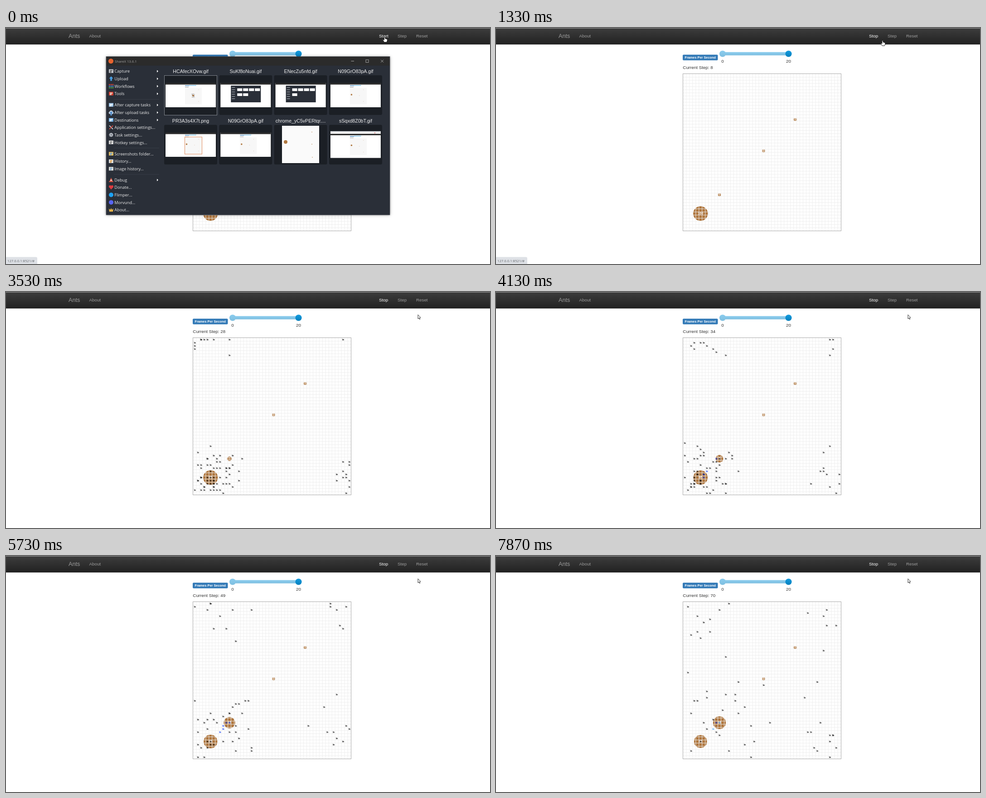
An HTML page with a canvas that plays this animation: 1068 px wide and 524 px high, repeating every 8000 ms.

```html
<!DOCTYPE html>
<html lang="en">
<head>
<meta charset="utf-8">
<title>Ants</title>
<style>
html, body { margin: 0; width: 100%; height: 100%; overflow: hidden; background: #fff; }
canvas { display: block; }
</style>
</head>
<body>
<canvas id="stage" width="1068" height="524"></canvas>
<script>
const ctx = document.getElementById('stage').getContext('2d');
const LOOP = 8000, TICK = 200 / 3;
const SANS = '"Liberation Sans", Arial, sans-serif', UI = '"Open Sans", "Noto Sans", sans-serif';
const BROWN = '#b07840';
const GRID = { x: 413, y: 102.2, n: 50, cell: 6.96 };
const NEST = [5, 44], FOOD = [[11, 38], [25, 24], [35, 14]];

// Piecewise linear interpolation through [x, y] points
function at(x, points) {
  let [px, py] = points[0];
  if (x <= px) return py;
  for (const [qx, qy] of points) {
    if (x < qx) return py + (qy - py) * (x - px) / (qx - px);
    [px, py] = [qx, qy];
  }
  return py;
}
function rect(x, y, w, h, color) { ctx.fillStyle = color; ctx.fillRect(x, y, w, h); }
function frame(x, y, w, h, color, width = 1) {
  ctx.strokeStyle = color; ctx.lineWidth = width; ctx.strokeRect(x, y, w, h);
}
function disc(x, y, r, color) {
  ctx.fillStyle = color; ctx.beginPath(); ctx.arc(x, y, r, 0, 7); ctx.fill();
}
function round(x, y, w, h, r, color) {
  ctx.fillStyle = color; ctx.beginPath(); ctx.roundRect(x, y, w, h, r); ctx.fill();
}
function poly(points, fill, stroke) {
  ctx.beginPath();
  points.forEach(([x, y]) => ctx.lineTo(x, y));
  ctx.closePath();
  if (fill) { ctx.fillStyle = fill; ctx.fill(); }
  if (stroke) { ctx.strokeStyle = stroke; ctx.lineWidth = 0.9; ctx.stroke(); }
}
function line(x1, y1, x2, y2, color, width = 1) {
  ctx.strokeStyle = color; ctx.lineWidth = width;
  ctx.beginPath(); ctx.moveTo(x1, y1); ctx.lineTo(x2, y2); ctx.stroke();
}
function text(str, x, y, size, color, align = 'left', family = SANS, weight = '') {
  ctx.font = `${weight} ${size}px ${family}`;
  ctx.fillStyle = color; ctx.textAlign = align;
  ctx.fillText(str, x, y + size * 0.36);
}
function vertical(y1, y2, from, to) {
  const g = ctx.createLinearGradient(0, y1, 0, y2);
  g.addColorStop(0, from); g.addColorStop(1, to);
  return g;
}

let seed = 11;
function random() {
  seed = (seed * 1664525 + 1013904223) % 4294967296;
  return seed / 4294967296;
}

// Drifting random walks out of the nest, one cell list per ant
const ANTS = 100, STEPS = 72;
const walks = Array.from({ length: ANTS }, (_, i) => {
  const angle = random() * 2 * Math.PI, speed = 0.24 * i / ANTS;
  let x = NEST[0] + 0.5, y = NEST[1] + 0.5;
  return Array.from({ length: STEPS }, () => {
    const cell = [x, y].map(v => (Math.floor(v) + 100) % GRID.n);
    x += Math.cos(angle) * speed + (random() - 0.5) * 2.2;
    y += Math.sin(angle) * speed + (random() - 0.5) * 2.2;
    return cell;
  });
});

const center = ([col, row]) => [GRID.x + (col + 0.5) * GRID.cell, GRID.y + (row + 0.5) * GRID.cell];

function ant(cell, color) {
  const [x, y] = center(cell);
  ctx.globalAlpha = 0.7;
  ctx.fillStyle = color;
  ctx.beginPath();
  ctx.ellipse(x + 0.5, y + 0.3, 2.3, 0.9, 0, 0, 7);
  ctx.fill();
  line(x - 2.5, y - 1.2, x + 1.4, y + 0.4, color, 0.5);
  line(x - 0.8, y - 2.4, x + 1, y + 2.4, color, 0.5);
  line(x + 0.8, y - 1.8, x - 1.4, y + 2.4, color, 0.5);
  ctx.globalAlpha = 1;
}

function drawAnts(step) {
  const gone = at(step, [[18, 0], [55, 43]]);
  walks.forEach((walk, i) => { if (i >= gone) ant(walk[step], '#1c1c1c'); });
  const carriers = Math.round(at(step, [[28, 0], [40, 7], [59, 3], [70, 3]]));
  for (let i = 0; i < carriers; i++) {
    const p = i ? Math.abs((step * 0.19 + i * 0.31) % 2 - 1) : 1;
    const cell = NEST.map((v, k) => Math.round(v + (FOOD[0][k] - v) * p + (i % 3 - 1) * (k ? 0 : 0.6)));
    ant(cell, step > 66 && i ? '#3a9cf0' : '#0a35ee');
  }
}

function pile(cell, r, count) {
  const [x, y] = center(cell);
  disc(x, y, r, BROWN);
  text(count, x, y - 0.3, 7, '#fff', 'center', SANS, 'bold');
}

function drawGrid(step, antsShown) {
  const { x, y, n, cell } = GRID, size = n * cell;
  const left = Math.round(at(step, [[27, 100], [40, 91], [59, 85], [70, 82]]));
  pile(NEST, at(step, [[28, 16.2], [40, 15.6], [59, 14.7], [70, 14.4]]), left);
  const radius = at(step, [[24, 3.2], [28, 5.2], [40, 11.7], [59, 13.7], [70, 14.2]]);
  FOOD.forEach((spot, i) => pile(spot, i ? 3.2 : radius, i ? 0 : 100 - left));
  for (let i = 1; i < n; i++) {
    line(x + i * cell, y, x + i * cell, y + size, '#eee', 0.9);
    line(x, y + i * cell, x + size, y + i * cell, '#eee', 0.9);
  }
  frame(412.5, 101.5, 349, 349, '#aaa');
  if (antsShown) drawAnts(step);
}

function drawPage(step, running) {
  rect(0, 0, 1068, 524, '#fff');
  rect(0, 0, 1068, 36, vertical(1, 36, '#3c3c3c', '#222'));
  rect(0, 0, 1068, 1, '#999');
  rect(0, 35.6, 1068, 0.9, '#080808');
  text('Ants', 138, 17.8, 12.6, '#9d9d9d');
  text('About', 183.5, 17.5, 9.8, '#9d9d9d');
  text(running ? 'Stop' : 'Start', 823, 17.5, 9.8, '#fff');
  text('Step', 864, 17.5, 9.8, '#9d9d9d');
  text('Reset', 905, 17.5, 9.8, '#9d9d9d');

  round(412, 59.3, 77.5, 12.5, 2, '#337ab7');
  text('Frames Per Second', 450.7, 65.3, 7.35, '#fff', 'center', SANS, 'bold');
  round(500, 53.5, 146, 7.2, 3, vertical(53, 61, '#8accee', '#7fbfe0'));
  disc(500, 57.2, 7, vertical(50, 64, '#8accee', '#7fbfe0'));
  disc(645.5, 57.2, 7, vertical(50, 64, '#149bdf', '#0480be'));
  text('0', 500, 73, 9.8, '#333', 'center');
  text('20', 645.5, 73, 9.8, '#333', 'center');
  text('Current Step: ' + step, 412.3, 87, 9.8, '#333');
}

function drawStatus(alpha) {
  ctx.globalAlpha = alpha;
  round(-4, 508.5, 73, 20, 3, '#dee1e6');
  text('127.0.0.1:8521/#', 3, 516.8, 7.7, '#5f6368', 'left', UI);
  ctx.globalAlpha = 1;
}

function drawHand(x, y) {
  const outline = [[-1, 0], [0.8, 0], [1.2, 4], [5, 5], [6, 6.5], [5.5, 9.5], [4.5, 12], [-0.8, 12], [-4, 7.2], [-3, 6.2], [-1.2, 7.4]];
  poly(outline.map(([dx, dy]) => [x + dx, y + dy]), '#fff', '#111');
}
function drawArrow(x, y) {
  const outline = [[0, 0], [0, 9], [2, 7.2], [3.4, 10.2], [4.8, 9.6], [3.5, 6.6], [6, 6.4]];
  poly(outline.map(([dx, dy]) => [x + dx, y + dy]), '#fff', '#222');
}

const icons = {
  box: (x, y, a, b) => { rect(x - 5, y - 4, 10, 8, a); rect(x - 3, y - 2, 6, 2, b); rect(x - 3, y + 1, 4, 2, b); },
  up: (x, y, a) => { poly([[x, y - 5], [x + 4.5, y], [x - 4.5, y]], a); rect(x - 1.7, y - 1, 3.4, 6, a); },
  grid: (x, y) => ['#e2483c', '#4d8fe0', '#58b04c'].forEach((c, i) => {
    for (let k = 0; k < 3; k++) rect(x - 5 + k * 3.8, y - 4.5 + i * 3.5, 2.6, 2.4, c);
  }),
  disc: (x, y, a) => disc(x, y, 5, a),
  cloud: (x, y, a, b) => { disc(x - 2.5, y + 1, 2.7, a); disc(x + 2.5, y + 1, 2.7, a); disc(x, y - 1, 3.2, a); icons.up(x, y + 2, b); },
  tools: (x, y, a, b) => { line(x - 4, y - 4, x + 4, y + 4, a, 2); line(x + 4, y - 4, x - 4, y + 4, b, 2); },
  gear: (x, y, a, b) => {
    for (let i = 0; i < 4; i++) {
      const c = 4.8 * Math.cos(i * 0.785), s = 4.8 * Math.sin(i * 0.785);
      line(x - c, y - s, x + c, y + s, a, 1.6);
    }
    disc(x, y, 3.2, a); disc(x, y, 1.2, b);
  },
  cone: (x, y, a, b) => { poly([[x, y - 5], [x + 4, y + 4], [x - 4, y + 4]], a); rect(x - 2, y, 4, 1.5, b); rect(x - 5, y + 3.5, 10, 1.3, a); },
  heart: (x, y, a) => { disc(x - 2.3, y - 1.8, 2.7, a); disc(x + 2.3, y - 1.8, 2.7, a); poly([[x - 4.8, y - 0.8], [x + 4.8, y - 0.8], [x, y + 5]], a); },
  crown: (x, y, a) => poly([[x - 5, y - 3], [x - 2, y], [x, y - 4], [x + 2, y], [x + 5, y - 3], [x + 4, y + 4], [x - 4, y + 4]], a),
};

// Menu groups: top y, then [label, icon, colour, accent, has submenu]
const menu = [
  [96, ['Capture', 'box', '#c9ccd2', '#555', 1], ['Upload', 'up', '#4aa3e8', '', 1],
    ['Workflows', 'grid', '', '', 1], ['Tools', 'box', '#d23b2e', '#eed', 1]],
  [171, ['After capture tasks', 'box', '#9cc4e8', '#fff', 1], ['After upload tasks', 'cloud', '#dfe5ee', '#5b93cc', 1],
    ['Destinations', 'box', '#79b6ea', '#fff', 1], ['Application settings...', 'tools', '#c7ccd4', '#d2493c'],
    ['Task settings...', 'gear', '#c7ccd4', '#2a2f38'], ['Hotkey settings...', 'box', '#e6e6e6', '#777']],
  [279.5, ['Screenshots folder...', 'box', '#e8bd5c', '#6aa4dc'], ['History...', 'box', '#dfe6ef', '#e09a3a'],
    ['Image history...', 'box', '#e2e2dc', '#7aa6cc']],
  [337.5, ['Debug', 'cone', '#dc5a48', '#fff', 1], ['Donate...', 'heart', '#dd3a3f'], ['Flimper...', 'disc', '#1da1f2'],
    ['Morvund...', 'disc', '#5865f2'], ['About...', 'crown', '#e5b34a']],
];

const files = ['HCAfecXOvw.gif', 'SuKf8oNuai.gif', 'ENecZu5nfd.gif', 'N09GrO83pA.gif',
  'PR3A3s4X7t.png', 'N09GrO83pA.gif', 'chrome_yC5vPERtqr....', 'sSqxd8Z0bT.gif'];

function miniPage(x, y, kind) {
  rect(x, y, 111, 54, '#fff');
  rect(x, y, 111, 3.6, '#2b2b2b');
  if (kind === 1 || kind === 2) {
    rect(x + 23, y + 6, 66, 37, '#2a2f38');
    for (let i = 0; i < 6; i++) {
      rect(x + 25, y + 9 + i * 5, 7, 2, '#7b8088');
      if (i > 3 && kind === 2) continue;
      rect(x + 37 + i % 4 * 13, y + 12 + (i > 3 ? 11 : 0), 11, 6, '#fff');
    }
    if (kind === 2) rect(x + 37, y + 23, 11, 6, '#fff');
    return;
  }
  rect(x + 43, y + 5.5, 9, 1.3, '#337ab7');
  rect(x + 52, y + 5, 16, 1.2, '#5fb3e3');
  rect(x + 43, y + 9, 8, 0.8, '#888');
  rect(x + 43, y + 10.6, 37, 37, '#f7f7f7');
  if (kind === 4) frame(x + 42.5, y + 10, 38, 38, '#e08a5c');
  if (kind === 0) {
    disc(x + 61, y + 28, 2, BROWN);
    for (let i = 0; i < 14; i++) disc(x + 61 + 3 * Math.sin(i * 2.4), y + 28 + 4 * Math.cos(i * 1.7), 0.5, '#333');
  } else disc(x + 46.5, y + 26, 1.8, BROWN);
  [[73, 15], [73, 41], [64, 28]].forEach(([dx, dy]) => disc(x + dx, y + dy, 0.4, BROWN));
}

function drawThumb(name, i) {
  const x = 349 + i % 4 * 121.3, y = i < 4 ? 105 : 215;
  text(name, x + 58.5, y - 9, 10.6, '#f0f0f0', 'center');
  round(x, y, 117, 88, 3, '#1b1f25');
  if (!i) frame(x + 0.5, y + 0.5, 116, 88, '#7f848c');
  if (i === 6) {
    rect(609, 217, 82, 83, '#fafafa');
    disc(617, 253, 4, BROWN);
    [[675, 258], [675, 231], [676, 287]].forEach(([px, py]) => disc(px, py, 0.8, BROWN));
  } else if (i === 7) {
    miniPage(x + 3, y + 19.5, i);
    rect(x + 3, y + 14, 111, 6, '#f1f1f1');
    rect(x + 3, y + 14, 111, 2, '#d5d8dd');
    disc(x + 101, y + 18, 0.9, '#d44');
  } else miniPage(x + 3, y + 17, i);
}

function drawWindow() {
  ctx.save();
  ctx.shadowColor = 'rgba(0,0,0,.45)';
  ctx.shadowBlur = 6;
  rect(221, 63.5, 626, 351.5, '#2a2f38');
  ctx.restore();
  rect(221, 63.5, 626, 20, '#2b2b2b');
  frame(221, 63.5, 626, 351.5, '#454950', 0.7);
  disc(231.5, 73.5, 5.5, '#e8632f');
  text('ShareX 13.6.1', 240, 73.8, 7.7, '#a0a0a0', 'left', UI);
  line(761.5, 73.5, 768, 73.5, '#aaa');
  frame(794, 70.5, 6, 6, '#aaa', 0.9);
  line(827, 70.5, 833, 76.5, '#aaa');
  line(833, 70.5, 827, 76.5, '#aaa');
  for (const [top, ...items] of menu) {
    items.forEach(([label, icon, a, b, sub], i) => {
      const y = top + i * 16.65;
      icons[icon](232, y - 0.3, a, b);
      text(label, 239.3, y, 9.1, '#ececec', 'left', UI);
      if (sub) poly([[333, y - 2.7], [336, y], [333, y + 2.7]], '#fff');
    });
  }
  [158.5, 266.5, 325].forEach(y => line(238, y, 338, y, '#3a404b', 0.8));
  files.forEach(drawThumb);
}

function render(now) {
  const t = now % LOOP, tick = Math.floor((t + 5) / TICK);
  const clock = at(tick, [[8, 0], [9, 0.1], [10, 1.4], [20, 8.1], [35, 18.6], [53, 28.7], [72, 40.6], [101, 59.5], [118, 70.6]]);
  const step = Math.floor(clock);
  // The board is cleared before the ants of each step are painted
  drawPage(step, tick >= 8);
  drawGrid(step, tick < 8 || clock % 1 > 0.25);
  if (tick < 5) drawWindow();
  const fade = at(tick, [[24, 1], [27, 0]]);
  if (fade) drawStatus(fade);
  const x = at(tick, [[17, 835.5], [20, 853], [22, 909]]);
  const y = at(tick, [[17, 19.5], [20, 27.5], [22, 50.5]]);
  (y > 36 ? drawArrow : drawHand)(x, y);
}

function loop() {
  render(performance.now());
  requestAnimationFrame(loop);
}
loop();
</script>
</body>
</html>
```
